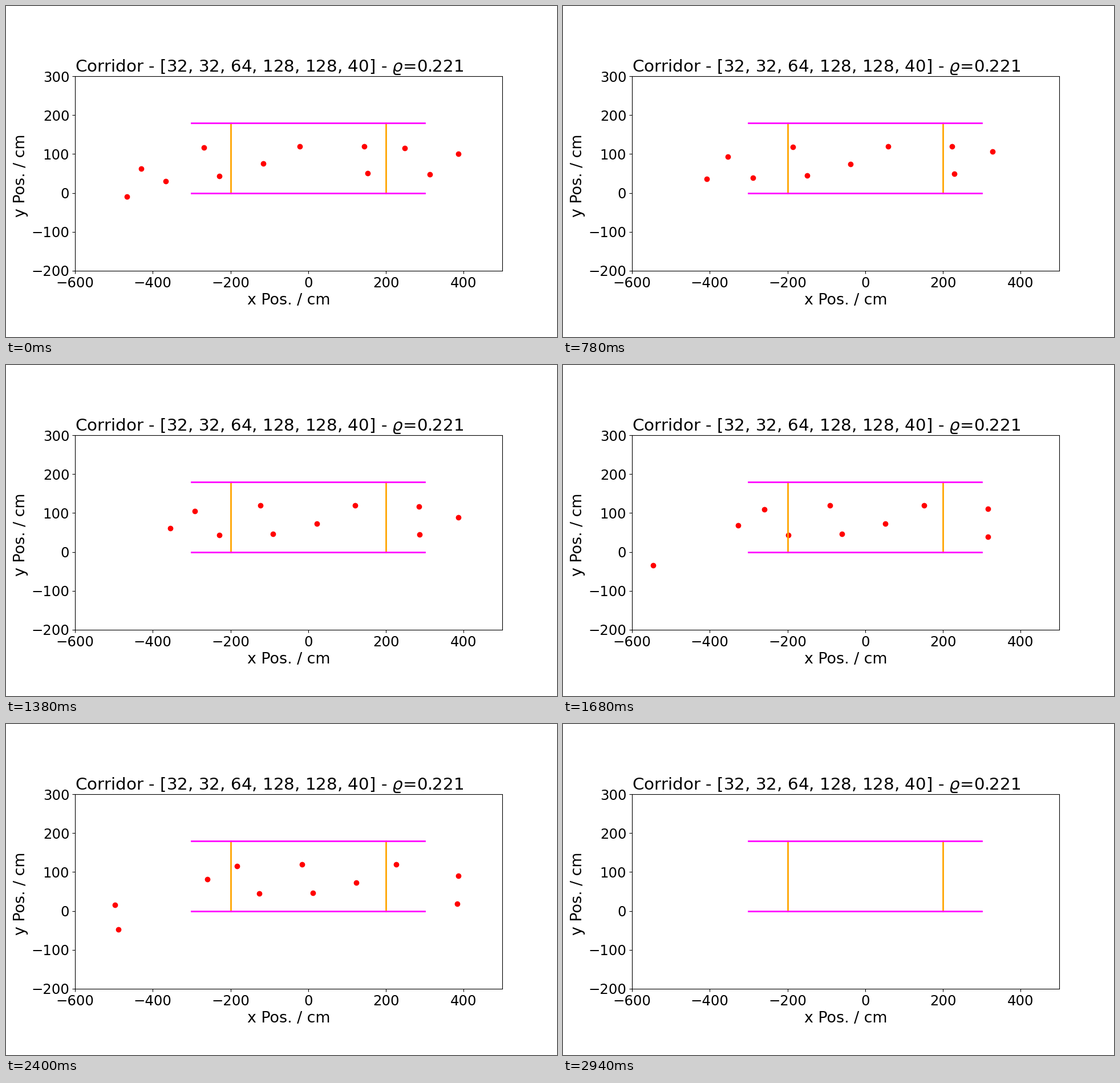
Animation of 966x580 px, one loop 3 s. Source, as a matplotlib script:

```python
import math
import matplotlib.pyplot as plt
from matplotlib.animation import FuncAnimation

W, H, DPI = 966, 580, 100
FRAMES, STEP = 50, 60
EXIT_X = 391      # walkers leave the view here
BEND_X = 235      # paths start to curve down here
BLEND = 100       # distance over which a walker merges into its lane

plt.rcParams["font.family"] = "DejaVu Sans"
fig = plt.figure(figsize=(W / DPI, H / DPI), dpi=DPI)
ax = fig.add_axes((121.05 / W, 116.2 / H, 749.4 / W, 340.65 / H))
ax.set_xlim(-600, 500)
ax.set_ylim(-200, 300)
ax.set_xticks(range(-600, 500, 200))
ax.set_yticks(range(-200, 301, 100))
ax.tick_params(labelsize=17.6)
ax.set_xlabel("x Pos. / cm", fontsize=19.4)
ax.set_ylabel("y Pos. / cm", fontsize=19.4, y=0.488)
ax.set_title(r"Corridor - [32, 32, 64, 128, 128, 40] - $\varrho$=0.221",
             loc="left", fontsize=21.2)

# measurement lines and corridor walls
for x in (-200, 200):
    ax.plot([x, x], [0, 180], color="orange", lw=2)
for y in (0, 180):
    ax.plot([-300, 300], [y, y], color="magenta", lw=2)


def drop(x):
    return 0.0013 * max(0, x - BEND_X) ** 2


def walk(lane, pace, x0, y0, born=0, gone=FRAMES - 1):
    """Positions by frame: merge into the lane, then bend down at the exit."""
    lag = y0 - lane + drop(x0)
    speed = pace - 0.0004 * x0

    def height(x):
        return lane - drop(x) + lag * math.exp((x0 - x) / BLEND)

    path, x = {}, x0
    for i in range(born, gone):
        if x > EXIT_X:
            break
        path[i] = x, height(x)
        slope = height(x + 0.5) - height(x - 0.5)
        x += speed / math.hypot(1, slope)
    return path


# (lane height, pace per frame): starting points
LANES = {
    (120, 6.20): [(-430, 62), (-268, 117), (-22, 119), (144, 119),
                  (249, 116), (387, 100)],
    (95, 5.65): [(-467, -10), (-560, -53, 24)],
    (72, 5.95): [(-116, 76)],
    (47, 5.90): [(-367, 30), (-228, 43), (153, 51), (313, 48, 0, 9),
                 (-488, -47, 40)],
}
paths = [walk(*lane, *start) for lane, starts in LANES.items()
         for start in starts]

dots = ax.scatter([], [], s=36, color="red", zorder=1)


def draw(i):
    pts = [p[i] for p in paths if i in p]
    dots.set_offsets(pts or [(math.nan, math.nan)])
    return dots,


anim = FuncAnimation(fig, draw, frames=FRAMES, interval=STEP,
                     repeat=True, repeat_delay=0)
plt.show()
```
